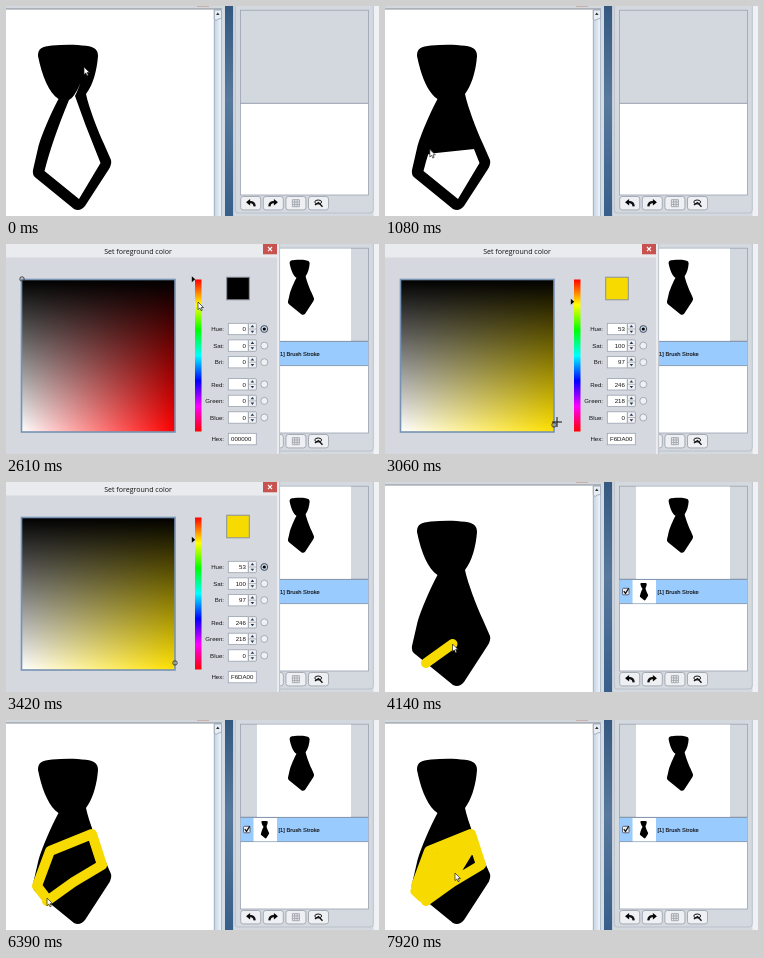
Recreate the animation shown at these times as an HTML page. Size 373 px wide and 210 px high, loop 8000 ms.

```html
<!DOCTYPE html>
<html lang="en">
<head>
<meta charset="utf-8">
<title>Drawing a tie</title>
<style>
html, body { margin: 0; width: 100%; height: 100%; overflow: hidden; background: #fff; }
svg { display: block; width: 100vw; height: 100vh; }
text { font-family: "Liberation Sans", Arial, sans-serif; font-size: 6.1px; fill: #111; }
.pen { fill: none; stroke-width: 10; stroke-linecap: round; stroke-linejoin: round; }
.edge { fill: #fff; stroke: #9aa3b1; stroke-width: .8; }
.button { fill: #eef0f3; stroke: #999ea7; stroke-width: .8; }
.icon { fill: none; stroke: #111; stroke-width: 2.2; }
</style>
</head>
<body>
<svg viewBox="0 0 373 210">
  <defs>
    <path id="tie" d="M32 50C32 42 36 40.5 46 39.5C58 38.3 70 38.3 80 39.8C89 41 92 44 92 50C91 64 87 79 80 88C83 102 92 125 98 138L105 154Q106 158 103 163L79 200Q74 206 68 203L30 172Q26 169 27 164L32.5 140C36 128 45 107 52.5 93C43 87 36 70 32 50Z"/>
    <clipPath id="inTie"><use href="#tie"/></clipPath>
    <linearGradient id="desk" x2="0" y2="1">
      <stop stop-color="#34587f"/><stop offset=".45" stop-color="#58799d"/><stop offset="1" stop-color="#375f8a"/>
    </linearGradient>
    <linearGradient id="track"><stop stop-color="#c4d3e3"/><stop offset="1" stop-color="#eff5fa"/></linearGradient>
    <linearGradient id="saturation">
      <stop stop-color="#fff"/><stop id="pureHue" offset="1"/>
    </linearGradient>
    <linearGradient id="darkness" x2="0" y2="1"><stop/><stop offset="1" stop-opacity="0"/></linearGradient>
    <linearGradient id="rainbow" x2="0" y2="1">
      <stop stop-color="#f00"/><stop offset=".167" stop-color="#ff0"/><stop offset=".333" stop-color="#0f0"/>
      <stop offset=".5" stop-color="#0ff"/><stop offset=".667" stop-color="#00f"/>
      <stop offset=".833" stop-color="#f0f"/><stop offset="1" stop-color="#f00"/>
    </linearGradient>
  </defs>

  <rect width="373" height="210" fill="#fff"/>
  <use href="#tie"/>
  <path id="hollow" fill="#fff" d="M63 94Q68 92 74.5 77Q71 86 69 90L79.5 119L94.5 157L73 193L38.5 165Q46 135 63 94Z"/>
  <g clip-path="url(#inTie)"><path id="blackPen" class="pen" stroke="#000"/></g>
  <path id="yellowPen" class="pen" stroke="#f6da00"/>

  <!-- window frame and scrollbar -->
  <path fill="#d3d7de" d="M0 0H219V3H0Z"/>
  <path fill="#c9a5a2" d="M191 0H203V.8H191Z"/>
  <path fill="#878d96" d="M0 2.5H216V3.6H0Z"/>
  <path fill="url(#track)" stroke="#8797a9" stroke-width=".7" d="M208.3 4H215.5V211H208.3Z"/>
  <path fill="#e8edf3" stroke="#8797a9" stroke-width=".7" d="M208.3 4H215.5V12.5Q212 12.5 210 14.5L208.3 13Z"/>
  <path fill="#333" d="M210 9L211.8 6.4L213.6 9Z"/>
  <path fill="#d3dbe5" d="M215.8 3H219V210H215.8Z"/>
  <path fill="url(#desk)" d="M219 0H227.5V210H219Z"/>

  <!-- layer panel -->
  <path fill="#d4d8df" d="M227.3 0H373V210H227.3Z"/>
  <path fill="#eff1f4" d="M367.5 0H373V210H367.5Z"/>
  <path fill="none" stroke="#b4bac4" stroke-width=".8" d="M229.3 0V204Q229.3 207 232 207H364Q367.3 207 367.3 204V0"/>
  <rect class="edge" x="234.4" y="4.2" width="128" height="93" style="fill:#d3d7de"/>
  <rect class="edge" x="234.4" y="97.4" width="128" height="91.6"/>
  <g id="layer">
    <rect x="251" y="4.6" width="94" height="92.4" fill="#fff"/>
    <use href="#tie" transform="translate(273 2.9) scale(.333)"/>
    <rect x="234.8" y="97.6" width="127.4" height="24" fill="#99cbff"/>
    <path stroke="#7b8ca3" stroke-width=".8" d="M234.5 97.4H362M234.5 121.6H362"/>
    <rect x="247.5" y="98" width="23.5" height="23.3" fill="#fff"/>
    <use href="#tie" transform="translate(252 96.8) scale(.106)"/>
    <rect class="button" x="237.5" y="106.3" width="6.5" height="6.5" rx="1" style="stroke:#445"/>
    <path class="icon" style="stroke-width:1.2" d="M238.8 109.1L240.5 111.4L243.8 106.1"/>
    <text x="272.5" y="111.5" stroke="#111" stroke-width=".12" style="font-size:5.75px">[1] Brush Stroke</text>
  </g>
  <g id="buttons"></g>

  <g id="dialog">
    <rect width="274" height="210" fill="#e9ebee"/>
    <path fill="#d5d8df" d="M0 13.5H271V210H0Z"/>
    <path stroke="#b4b8c0" stroke-width=".8" d="M273.6 0V210"/>
    <text x="132" y="9.7" text-anchor="middle" style="font-family:'Open Sans',sans-serif;font-size:7.05px">Set foreground color</text>
    <rect x="257" width="14" height="10.3" fill="#c85250"/>
    <path stroke="#fff" stroke-width="1.1" d="M262 3L266 7.2M266 3L262 7.2"/>
    <rect x="15.5" y="35.5" width="153.5" height="152.5" fill="url(#saturation)"/>
    <rect x="15.5" y="35.5" width="153.5" height="152.5" fill="url(#darkness)" stroke="#7793b3" stroke-width="1.6"/>
    <circle id="marker" r="2.2" fill="none" stroke="#333" stroke-width=".9"/>
    <rect x="189" y="35.5" width="6.5" height="152" fill="url(#rainbow)"/>
    <path id="huePointer" d="M185.8 -3L189.2 0L185.8 3Z"/>
    <rect id="swatch" x="220.7" y="33.2" width="22.6" height="22.6" stroke="#8b919b"/>
    <g id="rows"></g>
    <text x="218" y="197.3" text-anchor="end">Hex:</text>
    <rect class="edge" x="222.3" y="189.3" width="28" height="11.5"/>
    <text id="hex" x="225" y="197.3"></text>
  </g>

  <path id="arrow" fill="#fff" stroke="#222" stroke-width=".7" d="M0 0V7.6L1.8 6L3 8.7L4.3 8.1L3.1 5.5H5.5Z"/>
  <path id="cross" stroke="#111" stroke-width="1" d="M-5 0H5M0 -5V5"/>
</svg>
<script>
const LOOP = 8000, STEP = 90;
const $ = id => document.getElementById(id);
const show = (id, on) => { $(id).style.display = on ? "" : "none"; };

// Linear interpolation in a table of [key, value, value...]
function at(table, key) {
  const next = table.findIndex(row => row[0] > key);
  if (next === 0) return table[0].slice(1);
  if (next < 0) return table[table.length - 1].slice(1);
  const a = table[next - 1], b = table[next];
  const part = (key - a[0]) / (b[0] - a[0]);
  return a.slice(1).map((v, i) => v + (b[i + 1] - v) * part);
}

// Back-and-forth hatching between two edges, each a function of 0..1
function hatch(count, start, end, edgeA, edgeB) {
  return Array.from({ length: count + 1 }, (_, i) => {
    const u = i / count;
    return [start + (end - start) * u, ...(i % 2 ? edgeB : edgeA)(u)];
  });
}

const innerLeft = [[91, 58], [165, 34], [194, 70]];
const innerRight = [[87, 73], [157, 98], [194, 76]];
const side = edge => u => { const y = 92 + 102 * u; return [...at(edge, y), y]; };
const lower = [[0, 37, 177], [1, 70, 153]];
const upper = [[0, 32, 162], [.35, 47, 133], [.8, 82, 120], [.93, 84, 130]];

const blackTrack = [
  [0, 78, 61], [180, 75, 77], [270, 64, 89],
  ...hatch(20, 350, 1800, side(innerLeft), side(innerRight))
];
const yellowTrack = [
  [3870, 41, 181], [4140, 67.5, 162], [4410, 96, 145], [4770, 86, 114],
  [5400, 44, 131], [5940, 31, 166], [6300, 41, 179], [6400, 41, 178], [6500, 30.5, 171],
  ...hatch(14, 6580, 7920, u => at(lower, u), u => at(upper, u))
];
const cursorTrack = [
  ...blackTrack, [2070, 60, 216], [2339, 60, 216],
  [2340, 206, 130], [2610, 192, 58], [2700, 192, 58], [2880, 140, 150],
  [3060, 172, 178], [3240, 172, 178], [3420, 110, 216], [3600, 60, 216],
  ...yellowTrack
];
const shade = [[2879, 0, 0], [2880, 81, 76], [3060, 100, 96.63]];

function trail(track, t) {
  if (t < track[0][0]) return "";
  const done = track.filter(p => p[0] <= t).map(p => p.slice(1));
  return "M" + [...done, at(track, t)].map(p => p.join(" ")).join("L");
}

function hsv(h, s, v) {
  return [5, 3, 1].map(n => {
    const k = (n + h / 60) % 6;
    return Math.round(255 * v * (1 - s * Math.max(0, Math.min(k, 4 - k, 1))));
  });
}

const labels = ["Hue", "Sat", "Bri", "Red", "Green", "Blue"];
$("rows").innerHTML = labels.map((label, i) => {
  const y = 85 + 16.6 * i + (i > 2 ? 5.5 : 0);
  return `<g transform="translate(0 ${y})">
    <text x="218" y="2.2" text-anchor="end">${label}:</text>
    <rect class="edge" x="222.3" y="-5.7" width="20" height="11.4"/>
    <text class="value" x="239.8" y="2.2" text-anchor="end"></text>
    <rect class="button" x="242.4" y="-5.7" width="8" height="11.4" rx="1"/>
    <path stroke="#8f949d" stroke-width=".6" d="M242.4 0H250.4"/>
    <path fill="#24364f" d="M244.6 -1.7L246.4 -4L248.2 -1.7ZM244.6 1.7L246.4 4L248.2 1.7Z"/>
    <circle class="button" cx="258.3" r="3.5"/>
    ${i ? "" : '<circle cx="258.3" r="3.4" fill="#cbd8e8" stroke="#456"/><circle cx="258.3" r="1.6"/>'}
  </g>`;
}).join("");
const values = document.querySelectorAll(".value");

const undo = '<path d="M-4.6 -1L-.6 -4.2V2.2Z"/><path class="icon" d="M-1.5 -1H.5Q3.6 -.6 4 3.2"/>';
const icons = [
  undo,
  `<g transform="scale(-1 1)">${undo}</g>`,
  '<path fill="none" stroke="#a0a4ab" stroke-width=".9" d="M-3.5 -3.5H3.5V3.5H-3.5ZM-3.5 -1.2H3.5M-3.5 1.2H3.5M-1.2 -3.5V3.5M1.2 -3.5V3.5"/>',
  '<ellipse class="icon" cx="-.3" cy="-1.2" rx="3.4" ry="2" style="stroke-width:1"/><path class="icon" style="stroke-width:1.4" d="M-3.6 1.8L0 -.6L4 3.6"/>'
];
$("buttons").innerHTML = icons.map((icon, i) => `<g transform="translate(${244.7 + 22.6 * i} 197.2)">
  <rect class="button" x="-10" y="-6.7" width="20" height="13.4" rx="2.5"/>${icon}</g>`).join("");

function drawDialog(t) {
  const hue = t < 2700 ? 0 : 53;
  const [sat, bri] = at(shade, t);
  const rgb = hsv(hue, sat / 100, bri / 100);
  [hue, sat, bri, ...rgb].forEach((v, i) => { values[i].textContent = Math.round(v); });
  $("hex").textContent = rgb.map(v => v.toString(16).padStart(2, "0")).join("").toUpperCase();
  $("swatch").setAttribute("fill", `rgb(${rgb})`);
  $("pureHue").setAttribute("stop-color", `rgb(${hsv(hue, 1, 1)})`);
  $("marker").setAttribute("cx", 16 + sat * 1.53);
  $("marker").setAttribute("cy", 35 + bri * 1.51);
  $("huePointer").setAttribute("transform", `translate(0 ${35.3 + hue * .425})`);
}

function draw(now) {
  const t = Math.floor(now % LOOP / STEP) * STEP;
  const inDialog = t >= 2340 && t < 3510;
  show("hollow", t < 1800);
  show("layer", t >= 1890);
  show("dialog", inDialog);
  $("blackPen").setAttribute("d", trail(blackTrack, Math.min(t, 1800)));
  $("yellowPen").setAttribute("d", trail(yellowTrack, t));
  if (inDialog) drawDialog(t);

  const [x, y] = at(cursorTrack, t);
  const overSquare = inDialog && x > 14 && x < 174 && y > 34 && y < 190;
  show("arrow", !overSquare);
  show("cross", overSquare);
  $(overSquare ? "cross" : "arrow").setAttribute("transform", `translate(${x} ${y})`);
}

const begin = performance.now();
function tick() {
  draw(performance.now() - begin);
  requestAnimationFrame(tick);
}
tick();
</script>
</body>
</html>
```
